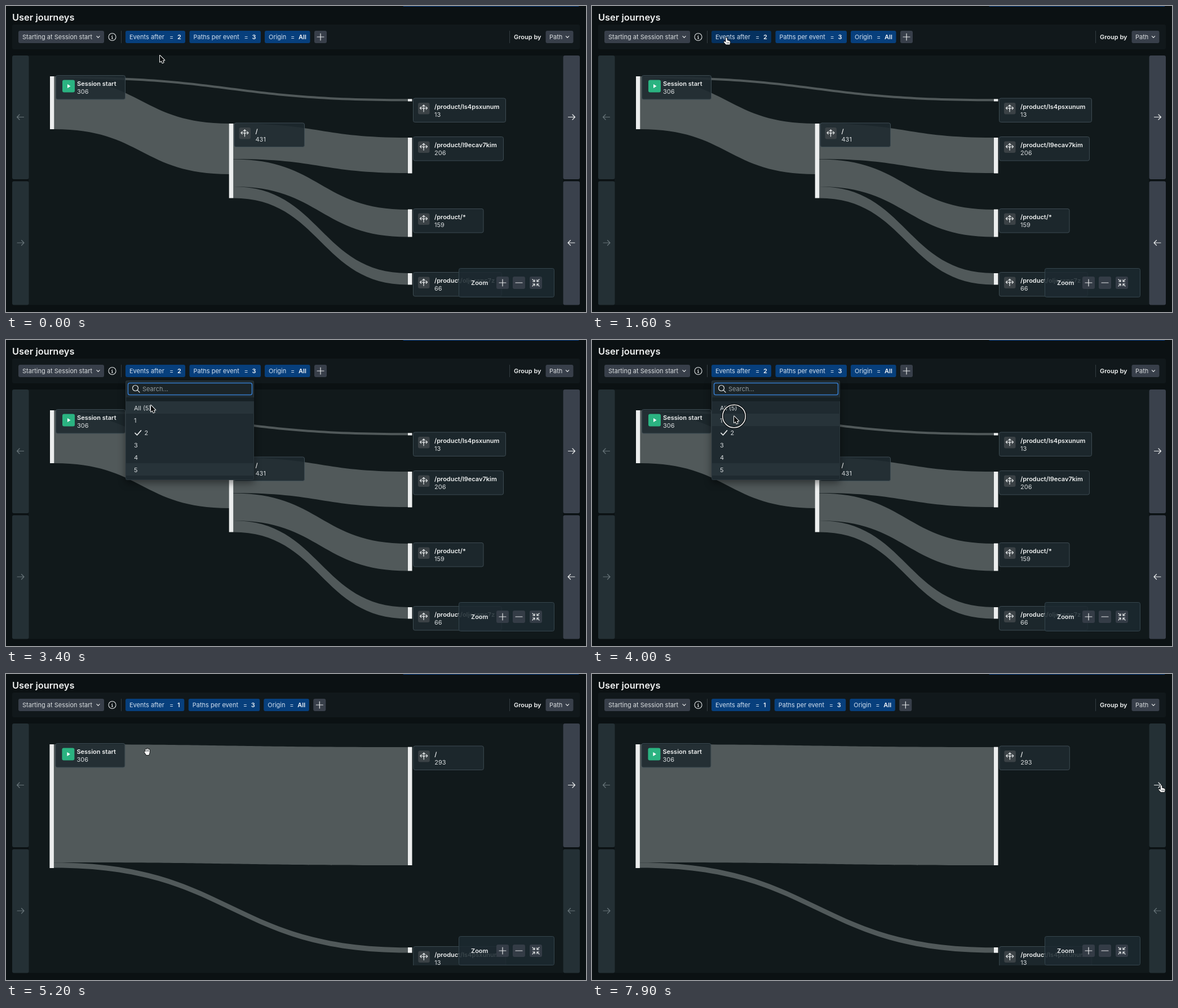
Animation of 1029x544 px, one loop 8000 ms. Source, as an HTML page with a canvas:

```html
<!DOCTYPE html>
<html lang="en">
<head>
<meta charset="utf-8">
<title>User journeys</title>
<style>
  html, body { margin: 0; width: 100%; height: 100%; overflow: hidden; background: #0b1113; }
  canvas { display: block; width: 1029px; height: 544px; }
</style>
</head>
<body>
<canvas id="stage" width="1029" height="544"></canvas>
<script>
const ctx = document.getElementById('stage').getContext('2d');
const LOOP = 8000, STEP = 100;
const MENU_OPEN = 2900, PICKED = 4200, NEXT_CLICK = 7000;
const WHITE = '#eceeee', LINK = '#51595a', SLATE = '#383f4a', DISABLED = [36, 48, 53], ACTIVE = [58, 65, 76];

// time, x, y, cursor shape
const CURSOR = [
  [0, 273, 88, 'arrow'], [200, 271, 86, 'arrow'], [500, 240, 62, 'point'], [800, 228, 56, 'point'],
  [1000, 232, 52, 'point'], [1300, 258, 50, 'point'], [1800, 228, 60, 'point'],
  [2300, 278, 57, 'point'], [2900, 277, 60, 'arrow'], [3400, 257, 116, 'arrow'],
  [3800, 252, 134, 'arrow'], [4200, 252, 137, 'grab'], [5000, 252, 137, 'grab'],
  [5200, 251, 138, 'grab'], [5400, 251, 138, 'grab'], [5500, 252, 138, 'grab'],
  [5800, 252, 138, 'grab'], [6600, 991, 173, 'point'], [6900, 1008, 198, 'point'],
  [7200, 1008, 198, 'point'], [7600, 985, 272, 'grab'], [7900, 1010, 198, 'point']
];
const CLICKS = [[2600, 2800], [4000, 4200], [6900, 7100]];

const clamp = v => Math.max(0, Math.min(1, v));
const ease = v => v * v * (3 - 2 * v);
const mixColor = (a, b, k) => `rgb(${a.map((v, i) => Math.round(v + (b[i] - v) * k))})`;

function box(x, y, w, h, fill, border, r = 3, lw = 1) {
  ctx.beginPath();
  ctx.roundRect(x, y, w, h, r);
  if (fill) { ctx.fillStyle = fill; ctx.fill(); }
  if (border) { ctx.strokeStyle = border; ctx.lineWidth = lw; ctx.stroke(); }
}

function text(s, x, y, color = '#d9dddf', weight = 400, size = 11) {
  ctx.font = `${weight} ${size}px Inter, sans-serif`;
  ctx.fillStyle = color;
  ctx.fillText(s, x, y);
}

function icon(x, y, path, color = '#e3e6e7', lw = 1.2) {
  ctx.save();
  ctx.translate(x, y);
  ctx.strokeStyle = color;
  ctx.lineWidth = lw;
  ctx.lineCap = ctx.lineJoin = 'round';
  ctx.stroke(new Path2D(path));
  ctx.restore();
}

const PLUS = 'M-6 0H6M0-6V6';
const CHEVRON = 'M-2.6-1.3L0 1.3L2.6-1.3';
const LEFT = 'M6 0H-6M-1.5-4.5L-6 0L-1.5 4.5';
const RIGHT = 'M-6 0H6M1.5-4.5L6 0L1.5 4.5';
const BRANCH = 'M0 6V-6M-2.3-3.7L0-6L2.3-3.7M-6.5-.5H-3Q0-.5 0 3Q0-.5 3-.5H6.5M-4.3-2.8L-6.5-.5L-4.3 1.8M4.3-2.8L6.5-.5L4.3 1.8';
const SHRINK = 'M-6-6L-2-2M-2-5.5V-2H-5.5M6-6L2-2M2-5.5V-2H5.5M-6 6L-2 2M-2 5.5V2H-5.5M6 6L2 2M2 5.5V2H5.5';

function link(x0, y0, x1, y1, h) {
  const m = (x0 + x1) / 2;
  ctx.beginPath();
  ctx.moveTo(x0, y0);
  ctx.bezierCurveTo(m, y0, m, y1, x1, y1);
  ctx.lineTo(x1, y1 + h);
  ctx.bezierCurveTo(m, y1 + h, m, y0 + h, x0, y0 + h);
  ctx.fillStyle = LINK;
  ctx.fill();
}

function bar(x, y, h) {
  ctx.fillStyle = WHITE;
  ctx.fillRect(x, y, 7.5, h);
}

function card(x, y, w, name, count, start) {
  box(x + .5, y + .5, w - 1, 42.5, 'rgba(30,41,47,.88)', '#3d4b52');
  if (start) {
    box(x + 12, y + 8.5, 22, 22, '#2bb381');
    ctx.fillStyle = '#fff';
    ctx.fill(new Path2D(`M${x + 21} ${y + 16}l5.5 3.5l-5.5 3.5z`));
  } else {
    box(x + 9, y + 8.5, 20.5, 20.5, '#3b4246');
    icon(x + 19, y + 18.5, BRANCH);
  }
  text(name, x + 38, y + 19, '#eef0f0', 600);
  text(count, x + 38, y + 33);
}

function wideChart() {
  link(86, 125, 713, 165.3, 4);
  link(86, 129, 396, 209, 90);
  link(403, 209, 713, 234, 63);
  link(403, 272.5, 713, 362, 48.5);
  link(403, 321, 713, 475, 20.5);
  bar(78, 125, 94);
  bar(395.7, 209, 132.5);
  bar(713, 165.3, 4.2);
  bar(713, 234, 63.5);
  bar(713, 361.5, 49);
  bar(713, 475, 20.5);
  card(88, 123, 124, 'Session start', '306', true);
  card(404.5, 207.5, 125.5, '/', '431');
  card(722, 163.5, 165, '/product/ls4psxunum', '13');
  card(722, 232, 161, '/product/l9ecav7kim', '206');
  card(722, 360, 125.5, '/product/*', '159');
  card(722, 473, 158, '/product/oljecspc7z', '66');
}

function shortChart(t) {
  const s = clamp((t - PICKED) / 400) * .6;
  ctx.save();
  ctx.beginPath();
  ctx.rect(40, 88, 948, 430);
  ctx.clip();
  link(85.5 - s, 125, 713, 130, 210);
  link(85.5 - s, 335.3, 713, 486.3, 9.3);
  bar(78 - s, 125, 220);
  bar(713, 129.7, 210.3);
  bar(713, 486, 9.7);
  card(88 - s, 123, 124, 'Session start', '306', true);
  card(722 + s / 2, 127.5, 125.5, '/', '293');
  card(722 + s / 2, 484, 165, '/product/ls4psxunum', '13');
  ctx.restore();
}

function pill(x, w, label, eqX, value, hover) {
  box(x, 44, w, 22, hover ? '#05315f' : '#073f7c');
  text(label, x + 7, 59, '#d3e1f0');
  text('=', x + eqX, 59, '#d3e1f0');
  text(value, x + eqX + 14, 59, '#f0f4f8', 600);
}

function toolbar(t, hover) {
  const picked = t >= PICKED, d = picked ? -1.7 : 0;
  box(11, 33, 1007, 44, '#11181b');
  text('User journeys', 11, 26, '#f1f2f2', 600, 16.4);
  box(704, -3, 313, 4, '#0c4086', null, 2);
  box(22, 44, 152, 22, SLATE);
  text('Starting at Session start', 29, 59);
  icon(163.5, 55, CHEVRON);
  ctx.beginPath();
  ctx.arc(188.5, 55, 6.5, 0, 7);
  ctx.strokeStyle = '#e3e6e7';
  ctx.lineWidth = 1.1;
  ctx.stroke();
  icon(188.5, 55, 'M0-3V-2.8M-1-.6H0V3M-1 3H1', '#e3e6e7', 1.1);
  ctx.fillStyle = '#343d42';
  ctx.fillRect(204, 44, 1, 22);
  ctx.fillRect(893, 44, 1, 22);
  pill(212, 106 + d, 'Events after', 78, picked ? '1' : '2', hover);
  pill(325.5 + d, 126.5, 'Paths per event', 97, '3');
  pill(459 + d, 80.5, 'Origin', 46, 'All');
  box(547 + d, 44, 22, 22, SLATE);
  icon(558 + d, 55, PLUS);
  text('Group by', 901, 59, '#eef0f0', 600);
  box(957.5, 44, 49, 22, SLATE);
  text('Path', 964, 59);
  icon(996, 55, CHEVRON);
}

function sidePanels(t) {
  const dim = '#69757a', off = mixColor(DISABLED, DISABLED, 0);
  const back = clamp((t - PICKED) / 400), next = clamp((t - NEXT_CLICK) / 400);
  box(11, 88, 29.5, 220, off);
  box(11, 311.5, 29.5, 220, off);
  box(988.5, 88, 29.5, 220, mixColor(ACTIVE, DISABLED, next));
  box(988.5, 311.5, 29.5, 220, mixColor(ACTIVE, DISABLED, back));
  icon(25.5, 197.5, LEFT, dim);
  icon(26, 421, RIGHT, dim);
  icon(1003.5, 197.5, RIGHT, '#eef0f0');
  icon(1003, 421, LEFT, t >= PICKED ? dim : '#eef0f0');
}

function zoomPanel() {
  box(803.5, 466.5, 169, 51, 'rgba(29,41,48,.86)', '#35454d');
  text('Zoom', 825, 495.5, '#e8ebec', 600);
  [[870, PLUS], [899, 'M-6 0H6'], [929, SHRINK]].forEach(([x, path]) => {
    box(x, 481, 22, 22, '#343c46');
    icon(x + 11, 492, path);
  });
}

function menu(y) {
  ctx.save();
  ctx.shadowColor = 'rgba(0,0,0,.45)';
  ctx.shadowBlur = 14;
  ctx.shadowOffsetY = 5;
  box(212, 72, 228, 177, '#1f2a30');
  ctx.restore();
  box(212.5, 72.5, 227, 176, null, '#2b373d');
  box(216.5, 76.5, 220, 21, '#1b2428', '#3478c6', 3, 1.6);
  icon(230, 86, 'M3.6 3.6L7 7M4.5-.5A5 5 0 1 1-5.5-.5A5 5 0 1 1 4.5-.5');
  text('Search...', 242, 90.5, '#929ca1');
  ctx.fillStyle = '#172125';
  ctx.fillRect(213, 102, 227, 7);
  const hovered = Math.floor((y - 109) / 22);
  ['All (5)', '1', '2', '3', '4', '5'].forEach((label, i) => {
    const top = 109 + i * 22;
    if (i === hovered || i === 5) {
      ctx.fillStyle = '#273339';
      ctx.fillRect(213, top, 227, 22);
    }
    text(label, label === '2' ? 245.5 : 227, top + 15.5);
  });
  icon(234, 165, 'M-5 .5L-1.5 4L5.5-4', '#eef0f0', 1.7);
}

const SHAPES = {
  arrow: 'M0 0V11.5L2.7 9.2L4.5 13.3L6.6 12.4L4.8 8.4H8.3Z',
  point: 'M-1.3 1.2C-1.3-.5 1.2-.5 1.2 1.2V4.6L5 5.4Q7 6 6.7 8L5.8 12H-.8L-4.5 8C-5.2 6.8-3.7 5.8-2.6 6.9L-1.3 8Z',
  grab: 'M-3 0L-3.8-3.2C-4-4.6-2.4-4.8-2-3.6L-1.5-4.5C-1.5-6 .2-6 .3-4.5C.7-5.8 2.2-5.4 2-4L2.2-3.4C2.6-4.6 4.4-4.2 4 -2.4L3.8 2L2.4 6H-2L-5.2 1.5C-6-.2-4.3-1-3 0Z'
};

function cursorAt(t) {
  const i = CURSOR.findLastIndex(k => k[0] <= t);
  const a = CURSOR[i], b = CURSOR[i + 1] || a;
  const k = a === b ? 0 : ease((t - a[0]) / (b[0] - a[0]));
  return { x: a[1] + (b[1] - a[1]) * k, y: a[2] + (b[2] - a[2]) * k, kind: a[3] };
}

function drawCursor(c, t) {
  if (CLICKS.some(([from, to]) => t >= from && t < to)) {
    ctx.beginPath();
    ctx.arc(c.x, c.y, 20.3, 0, 7);
    ctx.strokeStyle = '#080b0c';
    ctx.lineWidth = 4;
    ctx.stroke();
    ctx.strokeStyle = '#f2f2f2';
    ctx.lineWidth = 1.6;
    ctx.stroke();
  }
  const arrow = c.kind === 'arrow', shape = SHAPES[c.kind];
  icon(c.x, c.y, shape, arrow ? '#f4f4f4' : '#080b0c', arrow ? 2 : 1.6);
  ctx.save();
  ctx.translate(c.x, c.y);
  ctx.fillStyle = arrow ? '#080b0c' : '#f6f6f6';
  ctx.fill(new Path2D(shape));
  ctx.restore();
  if (c.kind === 'grab') icon(c.x, c.y, 'M-1.6-3V-.3M.3-3.8V-.4M2.1-3V-.3', '#30373a', .7);
  if (c.kind === 'point') icon(c.x, c.y, 'M1 8V10M2.8 8V10M4.6 8V10', '#30373a', .7);
}

function draw(t) {
  const c = cursorAt(t);
  ctx.fillStyle = '#0b1113';
  ctx.fillRect(0, 0, 1029, 544);
  ctx.fillStyle = '#11191b';
  ctx.fillRect(40, 88, 948.5, 443.5);
  toolbar(t, c.kind === 'point' && c.x < 318 && c.y > 44 && c.y < 66);
  if (t < PICKED) wideChart();
  else shortChart(t);
  sidePanels(t);
  zoomPanel();
  if (t >= MENU_OPEN && t < PICKED) menu(c.y);
  drawCursor(c, t);
}

const began = performance.now();
function frame() {
  const t = (performance.now() - began) % LOOP;
  draw(Math.floor(t / STEP) * STEP);
  requestAnimationFrame(frame);
}
frame();
</script>
</body>
</html>
```
